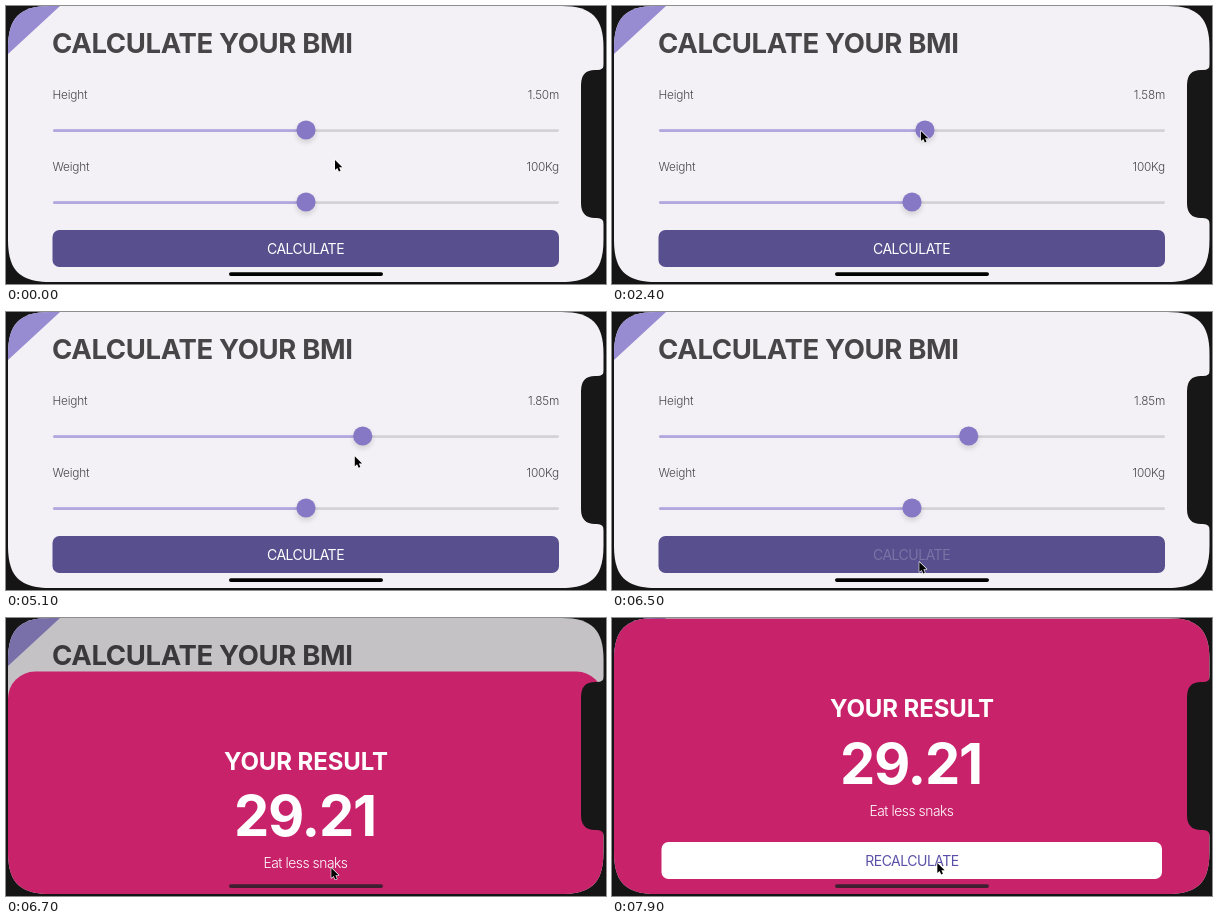
Write an HTML page that moves like this. It is 600 px wide and 278 px high and loops after 8 s.

```html
<!DOCTYPE html>
<html lang="en">
<head>
<meta charset="utf-8">
<title>BMI calculator</title>
<style>
  html, body { margin: 0; width: 100%; height: 100%; overflow: hidden; background: #151515; }
  svg { display: block; width: 600px; height: 278px; font-family: Inter, "Open Sans", sans-serif; }
  .title { font-size: 27.5px; font-weight: 700; letter-spacing: -.35px; fill: #484548; }
  .label { font-size: 11.8px; font-weight: 300; letter-spacing: -.2px; fill: #48464a; }
  .button { font-size: 14px; letter-spacing: -.5px; }
  .mid { text-anchor: middle; }
  .end { text-anchor: end; }
  .result { font-size: 24px; font-weight: 700; letter-spacing: -.1px; }
  .score { font-size: 56px; font-weight: 700; letter-spacing: -1.2px; }
  .advice { font-size: 13.8px; font-weight: 300; letter-spacing: -.45px; }
</style>
</head>
<body>
<svg viewBox="0 0 600 278">
  <defs>
    <clipPath id="screen">
      <path d="M44 0H555.5C586 0 597.5 12 597.5 42V234C597.5 264 586 276 555.5 276H44C13.5 276 2 264 2 234V42C2 12 13.5 0 44 0Z"/>
    </clipPath>
    <filter id="soft" x="-50%" y="-50%" width="200%" height="200%"><feGaussianBlur stdDeviation="2.5"/></filter>
    <g id="thumb">
      <circle cy="3" r="10" fill="#000" opacity=".12" filter="url(#soft)"/>
      <circle r="9.6" fill="#8778c6"/>
    </g>
    <rect id="track" x="47" y="123.2" width="506" height="2.8" rx="1.4" fill="#d4d2d7"/>
  </defs>
  <rect width="600" height="278" fill="#151515"/>
  <g clip-path="url(#screen)">
    <rect width="600" height="278" fill="#f3f1f5"/>
    <path d="M0 0H54L2 48H0Z" fill="#978bd2"/>
    <text class="title" x="46" y="47">CALCULATE YOUR BMI</text>

    <text class="label" x="46.5" y="92.5">Height</text>
    <text class="label end" id="height" x="553" y="92.5"></text>
    <use href="#track"/>
    <rect id="fill" x="47" y="123.2" height="2.8" rx="1.4" fill="#b2a7df"/>
    <use id="knob" href="#thumb"/>

    <text class="label" x="46.5" y="164.5">Weight</text>
    <text class="label end" x="553" y="164.5">100Kg</text>
    <use href="#track" y="72"/>
    <rect x="47" y="195.2" width="253" height="2.8" rx="1.4" fill="#b2a7df"/>
    <use href="#thumb" x="300" y="196"/>

    <rect x="46.5" y="224" width="506.5" height="37" rx="7" fill="#574f8e"/>
    <text class="button mid" id="calculate" x="299.5" y="248" fill="#fff">CALCULATE</text>

    <rect id="dim" width="600" height="278"/>
    <g id="sheet" fill="#fff">
      <rect x="2" y=".7" width="595.5" height="320" rx="27" fill="#c8226a"/>
      <text class="result mid" x="300" y="99">YOUR RESULT</text>
      <text class="score mid" x="299" y="165.5">29.21</text>
      <text class="advice mid" x="299.5" y="197.5">Eat less snaks</text>
      <rect x="49.5" y="224" width="500.5" height="37" rx="7"/>
      <text class="button mid" x="300" y="248" fill="#5a50a8">RECALCULATE</text>
    </g>
  </g>
  <path d="M598 58Q598 64 591 64H589Q575 64 575 79V197Q575 212 589 212H591Q598 212 598 219Z" fill="#171717"/>
  <rect id="home" x="223" y="266.2" width="154" height="3.8" rx="1.9"/>
  <path id="cursor" d="M0 0V10L2.3 7.9L3.9 11.5L5.6 10.7L4.1 7.2H7.3Z" stroke="#fff" stroke-width="1.2" stroke-linejoin="round" paint-order="stroke"/>
</svg>
<script>
const LOOP = 8000, STEP = 100, OPEN = 6500;
const el = id => document.getElementById(id);

function draw(t) {
  // Smooth step from 0 to 1 between two times
  const ramp = (from, to) => {
    const p = Math.min(1, Math.max(0, (t - from) / (to - from)));
    return p * p * (3 - 2 * p);
  };

  const pull = ramp(2500, 3400);
  const dragged = .08 * ramp(1000, 1500) + .28 * pull;
  const meters = 1.5 + dragged - .01 * ramp(4000, 4400);
  const x = 300 + (meters - 1.5) * 162;
  el('height').textContent = meters.toFixed(2) + 'm';
  el('fill').setAttribute('width', x - 47);
  el('knob').setAttribute('transform', `translate(${x} 124)`);
  el('calculate').setAttribute('opacity', t >= 6400 ? .2 : 1);

  // The cursor reaches the knob, drags it, drops to the button and presses
  const reach = ramp(0, 900), drop = ramp(5070, 5210);
  const cx = 329 - 33 * reach + 162 * dragged - 47 * drop + 18 * ramp(OPEN, 6700);
  const cy = 154 - 29 * reach + 7 * pull + 104 * drop + 14 * ramp(5400, 6200) - 5 * ramp(7200, 7500);
  el('cursor').setAttribute('transform', `translate(${cx} ${cy})`);

  // Critically damped spring
  const s = Math.max(0, t - OPEN) * .0153;
  const rest = (1 + s) * Math.exp(-s);
  el('sheet').setAttribute('transform', `translate(0 ${278 * rest})`);
  el('dim').setAttribute('opacity', .24 * (1 - rest));
  el('home').setAttribute('fill', t > OPEN ? '#3e2030' : '#000');
}

const start = performance.now();
function tick() {
  const t = (performance.now() - start) % LOOP;
  draw(Math.floor(t / STEP) * STEP);
  requestAnimationFrame(tick);
}
tick();
</script>
</body>
</html>
```
